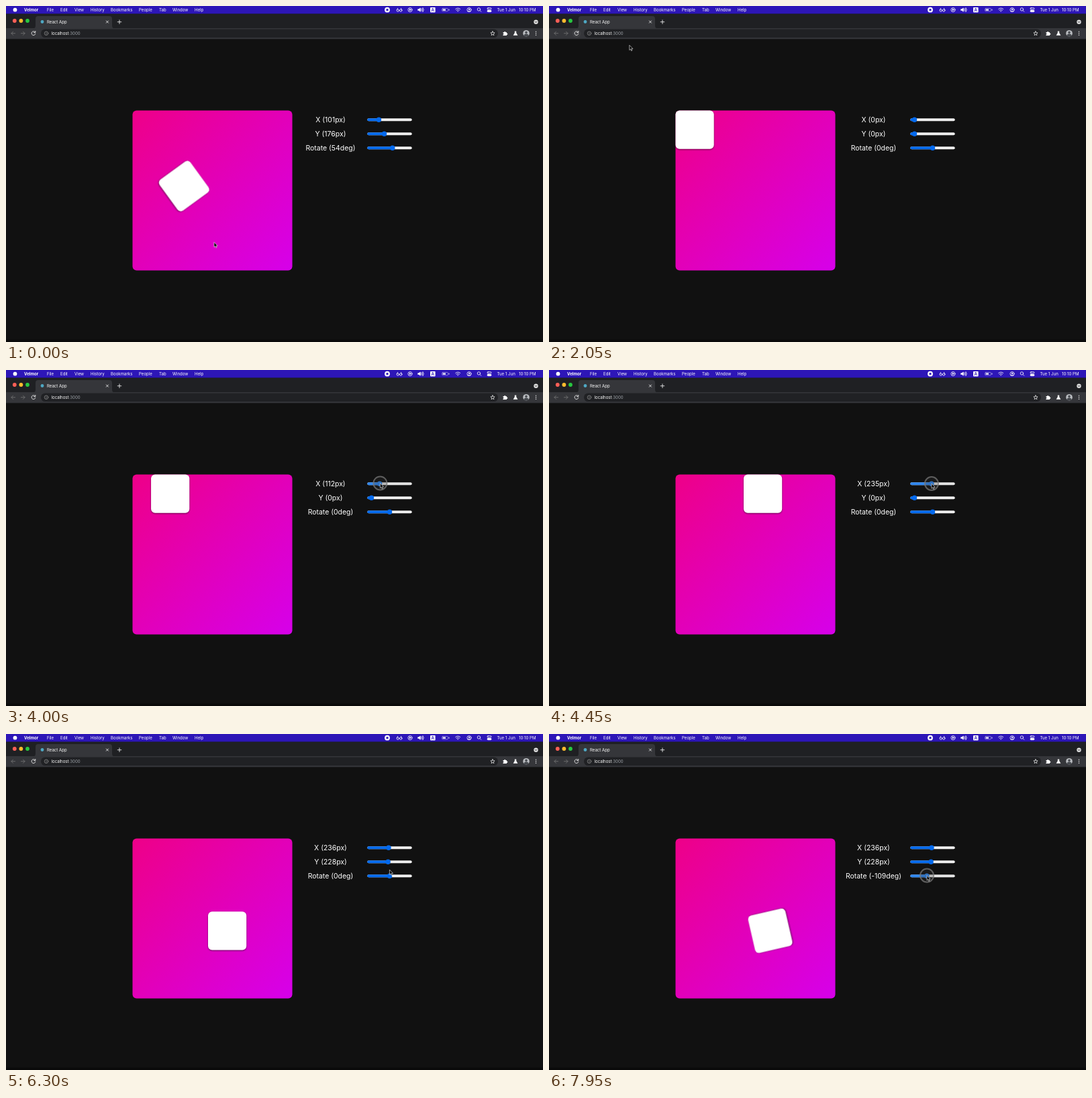
Recreate the animation shown at these times as an HTML page. Size 800 by 500 pixels, loop 8 s.

```html
<!DOCTYPE html>
<html lang="en">
<head>
<meta charset="utf-8">
<title>React App</title>
<style>
  html, body { margin: 0; width: 100%; height: 100%; overflow: hidden; background: #111; }
  svg { display: block; width: 800px; height: 500px; }
  text { font-family: Inter, Roboto, sans-serif; font-size: 6.1px; fill: #fff; white-space: pre; }
  .label { font-size: 10.45px; text-anchor: middle; }
  .line { fill: none; stroke: #fff; stroke-width: .8; stroke-linecap: round; stroke-linejoin: round; }
  .card { fill: #fff; filter: drop-shadow(0 1px 1px rgba(0, 0, 0, .55)); }
</style>
</head>
<body>
<svg viewBox="0 0 800 500">
  <defs>
    <linearGradient id="pink" x1="0" y1="0" x2="1" y2="1">
      <stop stop-color="#ee0088"/><stop offset="1" stop-color="#d600ea"/>
    </linearGradient>
  </defs>

  <!-- Window -->
  <rect width="800" height="500" fill="#111"/>
  <rect y="496.5" width="800" height="3.5" fill="#0a0a0a"/>
  <rect y="11.5" width="800" height="22" fill="#1f2023"/>
  <rect y="33" width="800" height="16" fill="#35363a"/>
  <path d="M40 33.5Q44 33.5 44 29V19Q44 15 48 15H154Q158 15 158 19V29Q158 33.5 162 33.5Z" fill="#35363a"/>
  <rect x="52" y="34.5" width="681" height="12.6" rx="6.3" fill="#202124"/>
  <path d="M0 49.2H800" stroke="#242529" stroke-width=".6"/>
  <circle cx="12.8" cy="22" r="2.9" fill="#ff5f57"/>
  <circle cx="22.4" cy="22" r="2.9" fill="#febc2e"/>
  <circle cx="32" cy="22" r="2.9" fill="#28c840"/>
  <circle cx="54" cy="23.5" r="2.4" fill="#4fa9c4"/>
  <text x="61" y="25.8">React App</text>
  <path class="line" d="M149.3 22l3.2 3.2m0-3.2l-3.2 3.2M166.2 23.7h5.6m-2.8-2.8v5.6"/>
  <circle cx="789.5" cy="23.7" r="3.2" fill="#ddd"/>
  <path d="M788 23l1.5 1.6L791 23" fill="none" stroke="#202124" stroke-width=".9"/>

  <!-- Toolbar -->
  <path class="line" style="stroke:#777" d="M13.6 40.7H8m2.5-2.6L8 40.7l2.5 2.6M22.5 40.7H28m-2.5-2.6l2.5 2.6-2.5 2.6"/>
  <circle id="hover" cx="41" cy="40.7" r="6.5" fill="#55565a"/>
  <path class="line" d="M43.2 38.7a2.9 2.9 0 1 0 .6 2.7M43.8 37.4v2.2h-2.2"/>
  <circle class="line" cx="60" cy="40.7" r="2.8" style="stroke:#aaa;stroke-width:.6"/>
  <path d="M60 40.3v2M60 39v.6" stroke="#aaa" stroke-width=".7"/>
  <text x="67.5" y="42.9">localhost<tspan fill="#9aa0a6">:3000</tspan></text>
  <path class="line" style="stroke-width:.7" d="M725 37.7l.9 2 2.2.2-1.7 1.5.5 2.2-1.9-1.2-1.9 1.2.5-2.2-1.7-1.5 2.2-.2z"/>
  <path d="M740.5 39h1.6a1.1 1.1 0 1 1 2.2 0h1.6v1.6a1.1 1.1 0 1 1 0 2.1v1.4h-5.4v-1.5a1 1 0 1 0 0-2z" fill="#fff"/>
  <path d="M757.8 37.5h2.4v2.4l2.2 3.9h-6.8l2.2-3.9z" fill="#fff"/>
  <circle cx="775" cy="40.7" r="4.8" fill="#b9bcc0"/>
  <path d="M771.5 44a3.6 3.6 0 0 1 7 0 4.8 4.8 0 0 1-7 0z" fill="#45484d"/>
  <circle cx="775" cy="39.2" r="1.7" fill="#45484d"/>
  <g fill="#ddd"><circle cx="789.5" cy="38.2" r=".8"/><circle cx="789.5" cy="40.7" r=".8"/><circle cx="789.5" cy="43.2" r=".8"/></g>

  <!-- Menu bar -->
  <rect width="800" height="11.5" fill="#2d16b7"/>
  <circle cx="13.5" cy="5.7" r="2.9" fill="#fff"/>
  <g id="menu"></g>
  <circle cx="568" cy="5.7" r="3.9" fill="#fff"/>
  <rect x="566.5" y="4.2" width="3" height="3" rx=".5" fill="#2d16b7"/>
  <g class="line">
    <circle cx="583.8" cy="6.6" r="1.7"/><circle cx="588.2" cy="6.6" r="1.7"/>
    <path d="M582.3 5.8l1.2-2.3m6.2 2.3l-1.2-2.3"/>
    <circle cx="602" cy="5.7" r="3.1"/>
    <path d="M601.2 4.5v2.4l2-1.2z" fill="#fff"/>
    <path d="M614 4.8h1.2l2-1.7v5.2l-2-1.7H614z" fill="#fff"/>
    <path d="M618.7 4.4q1 1.3 0 2.6m1.2-3.6q1.8 2.3 0 4.6m1.2-5.4q2.6 3.1 0 6.2"/>
    <rect x="649.5" y="3.5" width="9" height="4.4" rx="1.2" style="stroke:#b9b0e8;stroke-width:.6"/>
    <rect x="650.6" y="4.6" width="4.3" height="2.2" fill="#fff" stroke="none"/>
    <path d="M660 5v1.4M669.6 4.6q3.6-3 7.2 0M671 6.2q2.2-1.8 4.4 0M672.6 7.8h1.2"/>
    <circle cx="690" cy="5.7" r="3.1"/><circle cx="690" cy="5" r=".8" fill="#fff"/><path d="M688.2 7.8q1.8-1.8 3.6 0"/>
    <circle cx="704.4" cy="5" r="2.2"/><path d="M706.1 6.7l1.7 1.7"/>
    <rect x="717" y="2.8" width="6" height="2.3" rx="1.1"/><rect x="717" y="6.4" width="6" height="2.3" rx="1.1" fill="#fff"/>
  </g>
  <rect x="632" y="2" width="7.6" height="7.6" rx="1" fill="#fff"/>
  <text x="635.8" y="8" text-anchor="middle" style="fill:#2d16b7;font-weight:600">A</text>

  <!-- Page -->
  <rect x="188.5" y="155.5" width="238" height="238" rx="6" fill="url(#pink)"/>
  <g id="box"><rect class="card" x="-28.6" y="-28.6" width="57.2" height="57.2" rx="6"/></g>
  <g id="sliders"></g>

  <circle id="ring" r="10" fill="#333" fill-opacity=".25" stroke="#777" stroke-opacity=".75" stroke-width="2"/>
  <path id="cursor" d="M0 0V7.3L1.7 5.8 2.8 8.4 4 7.9 2.9 5.4H5.2Z" fill="#000" stroke="#ddd" stroke-width=".7"/>
</svg>
<script>
const LOOP = 8000, STEP = 50, RELOAD = 1750, LAG = 150, SCALE = 0.4767;
const $ = id => document.getElementById(id);

const menu = [[27, 'Velmor'], [61, 'File'], [81, 'Edit'], [102, 'View'], [126, 'History'],
  [156, 'Bookmarks'], [198, 'People'], [228, 'Tab'], [248, 'Window'], [281, 'Help'],
  [731.5, 'Tue 1 Jun'], [764, '10:10 PM']];
$('menu').innerHTML = menu.map(([x, word], i) =>
  `<text x="${x}" y="7.9" font-weight="${i ? 400 : 700}">${word}</text>`).join('');

// Each slider: value before the reload, then one drag from zero to `to`.
const sliders = [
  { name: 'X', unit: 'px', before: 101, to: 236, start: 3550, end: 4480, zero: 544.5, slope: 0.108, press: [3300, 4530] },
  { name: 'Y', unit: 'px', before: 176, to: 228, start: 5094, end: 5937, zero: 544.5, slope: 0.108, press: [5010, 6000] },
  { name: 'Rotate', unit: 'deg', before: 54, to: -109, start: 6900, end: 7950, zero: 571.5, slope: 0.079, press: [6650, LOOP] },
];
const reloadPress = [1500, 1650];

sliders.forEach((s, i) => {
  const y = 169.2 + 21 * i;
  const group = document.createElementNS('http://www.w3.org/2000/svg', 'g');
  group.innerHTML = `<text class="label" x="483.5" y="${y + 4.1}"></text>
    <rect x="538.3" y="${y - 2}" width="66.4" height="4" rx="2"/>
    <rect x="538.3" y="${y - 2}" height="4" rx="2"/>
    <circle cy="${y}" r="3.7"/>`;
  $('sliders').append(group);
  [s.label, s.track, s.fill, s.thumb] = group.children;
});

// Cursor stops: time, x, y
const path = [[0, 310, 351.5], [200, 310, 351.5], [1350, 41, 38], [1667, 41, 38], [3200, 546, 168],
  [3550, 546, 168], [4480, 570, 169], [4560, 570, 169], [5000, 546, 190], [5094, 546, 190],
  [5937, 570.5, 190], [6050, 570.5, 190], [6500, 572, 210.5], [6900, 572, 210.5], [7950, 563, 210.5]];

function ease(t, start, end) {
  const u = Math.min(1, Math.max(0, (t - start) / (end - start)));
  return u * u * (3 - 2 * u);
}
const within = (t, [a, b]) => t >= a && t < b;
const dragged = (s, t) => s.to * ease(t, s.start, s.end);

function cursorAt(t) {
  const i = Math.max(1, path.findIndex(p => p[0] >= t));
  const [t0, x0, y0] = path[i - 1], [t1, x1, y1] = path[i];
  const k = ease(t, t0, t1);
  return [x0 + (x1 - x0) * k, y0 + (y1 - y0) * k];
}

function draw(t) {
  for (const s of sliders) {
    const value = Math.round(t < RELOAD ? s.before : dragged(s, t));
    const x = s.zero + s.slope * value;
    const active = within(t, s.press);
    s.label.textContent = `${s.name} (${value}${s.unit})`;
    s.track.setAttribute('fill', active ? '#e4e4e4' : '#efefef');
    s.fill.setAttribute('width', x - 538.3);
    s.fill.setAttribute('fill', active ? '#2f86ee' : '#0469ec');
    s.thumb.setAttribute('cx', x);
    s.thumb.setAttribute('fill', active ? '#2f86ee' : '#0469ec');
  }

  // The box trails behind the sliders.
  const [x, y, angle] = sliders.map(s => t < RELOAD ? s.before : dragged(s, t - LAG));
  $('box').setAttribute('transform',
    `translate(${217.1 + x * SCALE} ${184.1 + y * SCALE}) rotate(${angle})`);

  const at = `translate(${cursorAt(t)})`;
  const pressed = [reloadPress, ...sliders.map(s => s.press)].some(span => within(t, span));
  $('cursor').setAttribute('transform', at);
  $('ring').setAttribute('transform', at);
  $('ring').style.display = pressed ? '' : 'none';
  $('hover').style.opacity = ease(t, 1200, 1350) * (1 - ease(t, 1850, 2150));
}

const origin = performance.now();
function frame() {
  const t = (performance.now() - origin) % LOOP;
  draw(Math.floor(t / STEP) * STEP);
  requestAnimationFrame(frame);
}
frame();
</script>
</body>
</html>
```
